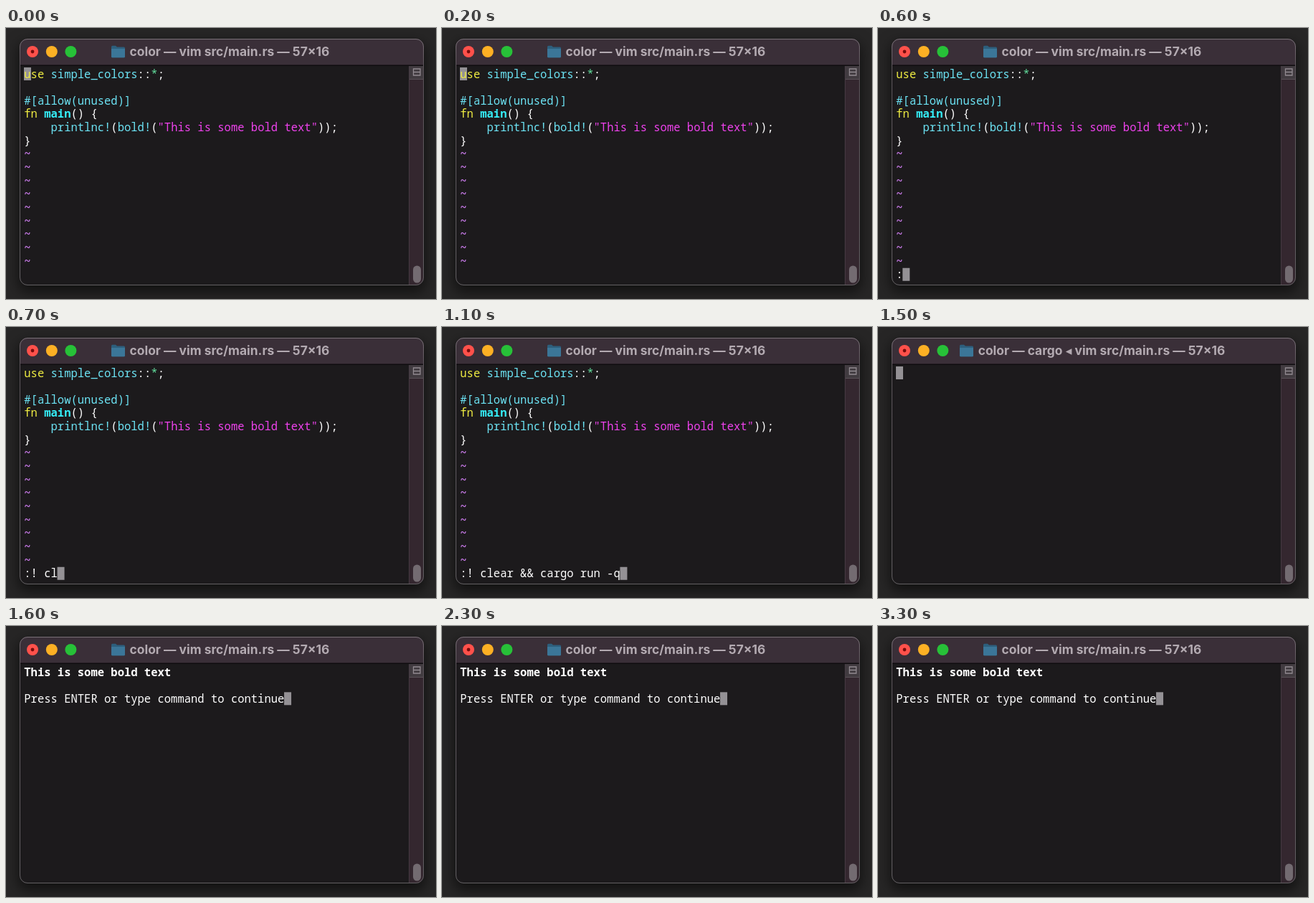
Recreate the animation shown at these times as an HTML page. Size 600 by 378 pixels, loop 4.2 s.

```html
<!DOCTYPE html>
<html lang="en">
<head>
<meta charset="utf-8">
<title>Terminal</title>
<style>
  html, body { margin: 0; width: 100%; height: 100%; overflow: hidden; background: #272626; }
  .stage { position: relative; width: 600px; height: 378px; overflow: hidden; }
  .stage > * { position: absolute; }
  .window {
    left: 19px; top: 15px; width: 564px; height: 344px; border-radius: 11px;
    box-shadow: 0 7px 18px 2px rgba(0, 0, 0, .55);
  }
  svg { left: 0; top: 0; }

  .title {
    left: -.75px; top: 15px; width: 600px; height: 36px;
    display: flex; align-items: center; justify-content: center; gap: 6.5px;
    font: 700 17.4px/36px Inter, "DejaVu Sans", sans-serif; color: #b3aab1; white-space: pre;
  }
  .title svg { position: static; flex: none; }

  .screen {
    --row: 18.65px;
    left: 25.3px; top: 54.5px; width: 536px; height: calc(16 * var(--row));
    font: 500 15.52px/var(--row) "Noto Sans Mono", "DejaVu Sans Mono", monospace; color: #fff;
  }
  .screen > * { position: absolute; left: 0; top: 0; margin: 0; font: inherit; white-space: pre; }
  .cursor { width: 1ch; height: var(--row); background: #949195; }
  .screen .command { top: calc(15 * var(--row)); overflow: hidden; }
  b { font-weight: 700; }
  .key { color: #efec42; }
  .id { color: #6ce3f4; }
  .fn { color: #35eef8; }
  .op { color: #62dd9c; }
  .str { color: #ee42ec; }
  .tilde { color: #c97bea; }

  .editor, .output, .running, .idle, .cursor, .command { animation: 4.2s step-end infinite; }
  .editor { animation-name: editor; }
  .output { animation-name: output; }
  .running { animation-name: running; }
  .idle { animation-name: idle; }
  .cursor { animation-name: cursor; }
  .command { animation-name: command; }

  @keyframes editor { 0% { visibility: visible } 28.57%, 100% { visibility: hidden } }
  @keyframes output { 0% { visibility: hidden } 38.09%, 100% { visibility: visible } }
  @keyframes running {
    0% { visibility: hidden } 30.95% { visibility: visible } 38.09%, 100% { visibility: hidden }
  }
  @keyframes idle {
    0% { visibility: visible } 30.95% { visibility: hidden } 38.09%, 100% { visibility: visible }
  }
  @keyframes command {
    0% { width: 0 }
    11.9% { width: 1ch }
    16.66% { width: 5ch }
    19.04% { width: 10ch }
    21.42% { width: 15ch }
    23.8% { width: 19ch }
    26.19% { width: 24ch }
    28.57%, 100% { width: 0 }
  }
  @keyframes cursor {
    0% { translate: 0 0 }
    11.9% { translate: 1ch calc(15 * var(--row)) }
    16.66% { translate: 5ch calc(15 * var(--row)) }
    19.04% { translate: 10ch calc(15 * var(--row)) }
    21.42% { translate: 15ch calc(15 * var(--row)) }
    23.8% { translate: 19ch calc(15 * var(--row)) }
    26.19% { translate: 24ch calc(15 * var(--row)) }
    28.57% { translate: 0 0 }
    38.09%, 100% { translate: 39ch calc(2 * var(--row)) }
  }
</style>
</head>
<body>
<div class="stage">
  <div class="window"></div>
  <svg width="600" height="378" viewBox="0 0 600 378">
    <defs>
      <clipPath id="frame"><rect x="19" y="15" width="564" height="344" rx="11"/></clipPath>
      <linearGradient id="edge" x2="0" y2="1">
        <stop stop-color="#7a7178"/><stop offset=".12" stop-color="#5d555b"/><stop offset="1" stop-color="#636063"/>
      </linearGradient>
      <symbol id="folder" viewBox="0 0 19 18">
        <path d="M0 2.2Q0 .7 1.5 .7H6L8 2.5H17.5Q19 2.5 19 4V15.8Q19 17.3 17.5 17.3H1.5Q0 17.3 0 15.8Z" fill="#2d5f7d"/>
        <path d="M0 5H19V15.8Q19 17.3 17.5 17.3H1.5Q0 17.3 0 15.8Z" fill="#3b7698"/>
      </symbol>
    </defs>
    <g clip-path="url(#frame)">
      <path d="M19 15H583V359H19Z" fill="#1c1a1c"/>
      <path d="M19 15H583V52H19Z" fill="#3a2f38"/>
      <path d="M562 53H583V359H562Z" fill="#34272f"/>
      <path d="M562.5 53V359" stroke="#453a42"/>
      <path d="M563 53H583V71H563Z" fill="#413b40"/>
      <path d="M563 71.5H583" stroke="#5a5258"/>
      <path d="M19 52.2H583" stroke="#0b090b" stroke-width="1.2"/>
    </g>
    <path d="M568.5 57H578V66H568.5ZM568.5 61.5H578" fill="none" stroke="#918a90" stroke-width="1.3"/>
    <rect x="568" y="331.5" width="11" height="24" rx="5.5" fill="#736b71"/>
    <rect x="19.5" y="15.5" width="563" height="343" rx="10.5" fill="none" stroke="url(#edge)"/>
    <circle cx="37" cy="33" r="8" fill="#ff514b"/>
    <circle cx="37" cy="33" r="2.4" fill="#760c0c"/>
    <circle cx="63.8" cy="33" r="8" fill="#fdb024"/>
    <circle cx="90.4" cy="33" r="8" fill="#27c138"/>
  </svg>

  <div class="title idle"><svg width="19" height="18"><use href="#folder"/></svg><span>color — vim src/main.rs — 57×16</span></div>
  <div class="title running"><svg width="19" height="18"><use href="#folder"/></svg><span>color — cargo ◂ vim src/main.rs — 57×16</span></div>

  <div class="screen">
    <div class="cursor"></div>
    <pre class="editor"><span class="key">use</span> <span class="id">simple_colors</span>::<span class="op">*</span>;

<span class="id">#[allow(unused)]</span>
<span class="key">fn</span> <b class="fn">main</b>() {
    <span class="id">printlnc!</span>(<span class="id">bold!</span>(<span class="str">"This is some bold text"</span>));
}
<b class="tilde">~
~
~
~
~
~
~
~
~</b></pre>
    <pre class="command">:! clear &amp;&amp; cargo run -q</pre>
    <pre class="output"><b>This is some bold text</b>

Press ENTER or type command to continue</pre>
  </div>
</div>
</body>
</html>
```
